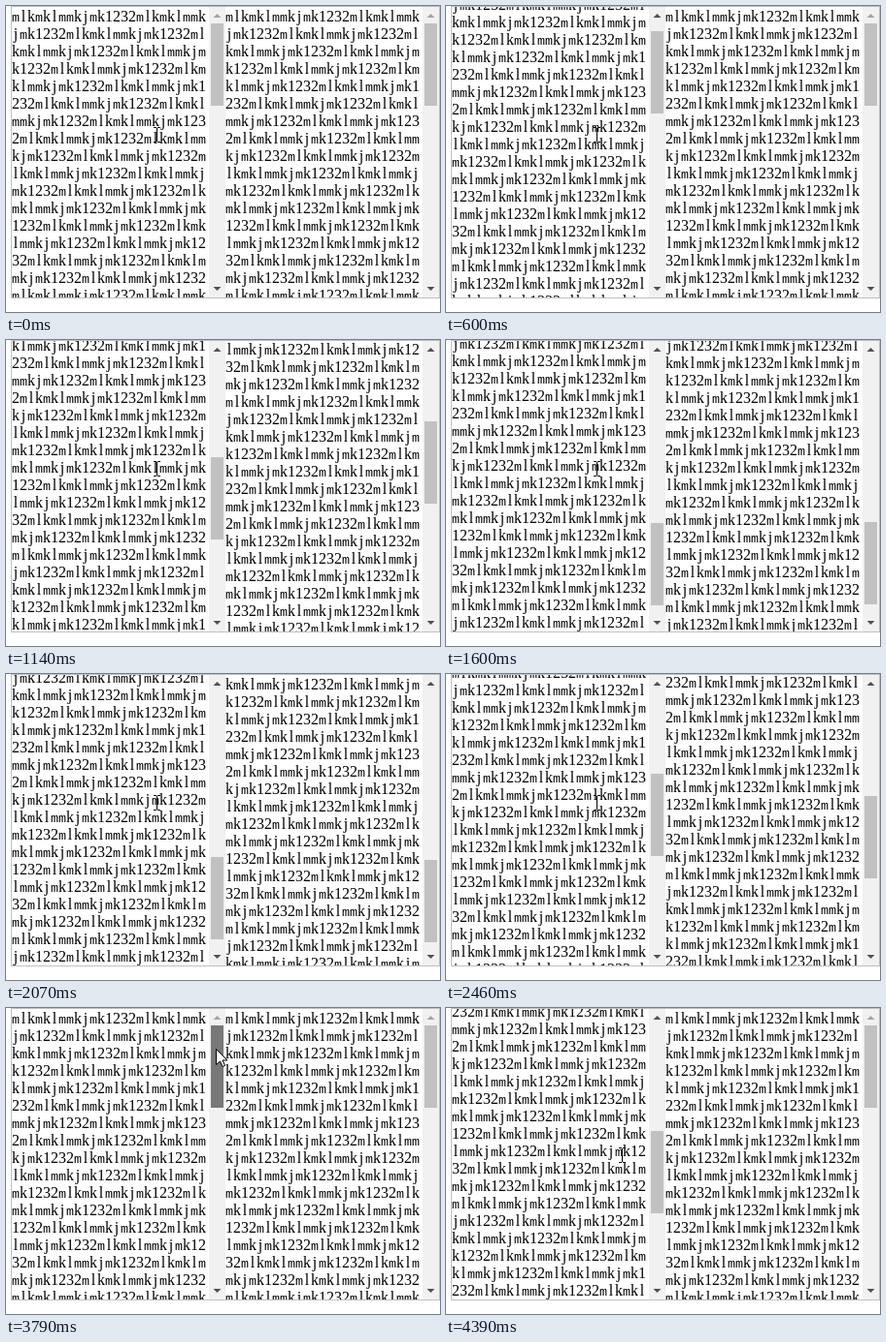
Recreate the animation shown at these times as an HTML page with a canvas. Size 447 by 316 pixels, loop 4470 ms.

```html
<!DOCTYPE html>
<html lang="en">
<head>
<meta charset="utf-8">
<title>Linked scroll panes</title>
<style>
  html, body { margin: 0; width: 100%; height: 100%; overflow: hidden; background: #fff; }
  canvas { display: block; }
</style>
</head>
<body>
<canvas id="stage" width="447" height="316"></canvas>
<script>
const ctx = document.getElementById('stage').getContext('2d');
const LOOP = 4470;
const PHRASE = 'mlkmklmmkjmk1232';
const COLS = 25, ROWS = 52, CELL = 8, LINE = 18;
const TOP = 1, VIEW = 300, BAR = 17;
const MAX_SCROLL = ROWS * LINE - VIEW;
const THUMB = 85, TRAVEL = VIEW - 2 * BAR - THUMB;
const PRESS = 3790, RELEASE = 4310, GRAB_Y = 42;

// time, left scroll, right scroll
const SCROLL = [
  [0, 0, 0],
  [600, 30, 0], [680, 98, 2], [760, 165, 6], [840, 200, 15],
  [980, 225, 60], [1060, 290, 135], [1140, 365, 235], [1220, 440, 340], [1300, 500, 450],
  [1600, 601, 599], [1680, 620, 607], [1750, 632, 618], [1830, 636, 628],
  [1990, 622, 624], [2070, 601, 612], [2150, 560, 585], [2220, 500, 545],
  [2300, 420, 490], [2380, 350, 430], [2460, 300, 380],
  [2550, 235, 320], [2630, 145, 240], [2700, 55, 150], [2780, 0, 71],
  [3000, 0, 0]
];

// time, x, y
const POINTER = [
  [0, 155, 133],
  [3240, 164, 119], [3320, 180, 98], [3400, 200, 74], [3470, 222, 56],
  [3550, 225, 47], [3630, 219, 44], [3700, 216, 42],
  [3870, 217, 52], [3940, 219, 72], [4020, 222, 97], [4090, 223, 122],
  [4160, 220, 142], [4240, 214, 151], [4310, 191, 152], [4390, 181, 152]
];

const at = (table, t) => table.findLast(row => row[0] <= t);

function box(color, x, y, w, h) {
  ctx.fillStyle = color;
  ctx.fillRect(x, y, w, h);
}

function shape(points, fill, stroke) {
  ctx.beginPath();
  points.forEach(([x, y]) => ctx.lineTo(x, y));
  ctx.closePath();
  ctx.fillStyle = fill;
  ctx.fill();
  if (stroke) {
    ctx.strokeStyle = stroke;
    ctx.lineWidth = 1;
    ctx.stroke();
  }
}

function drawText(x, scroll) {
  ctx.fillStyle = '#000';
  ctx.textAlign = 'center';
  ctx.textBaseline = 'alphabetic';
  const first = Math.floor(scroll / LINE);
  const last = Math.min(ROWS - 1, Math.floor((scroll + VIEW) / LINE));
  for (const wide of [true, false]) {
    ctx.font = wide ? '13.33px "Liberation Mono", monospace' : '16px "Liberation Serif", serif';
    for (let row = first; row <= last; row++) {
      const y = TOP + row * LINE - scroll + 15;
      for (let col = 0; col < COLS; col++) {
        const ch = PHRASE[(row * COLS + col) % PHRASE.length];
        if ((ch === 'm') === wide) ctx.fillText(ch, x + col * CELL + CELL / 2, y);
      }
    }
  }
}

function drawBar(x, scroll, color) {
  const mid = x + BAR / 2;
  const thumbY = TOP + BAR + Math.floor(scroll / MAX_SCROLL * TRAVEL);
  const arrow = (base, tip, on) =>
    shape([[mid - 4, base], [mid + 4, base], [mid, tip]], on ? '#505050' : '#a3a3a3');
  box('#f1f1f1', x, TOP, BAR, VIEW);
  arrow(12, 8, scroll > 0);
  arrow(290, 294, scroll < MAX_SCROLL);
  box(color, x + 2, thumbY, 13, THUMB);
}

function drawPane(x, scroll, thumbColor) {
  ctx.save();
  ctx.beginPath();
  ctx.rect(x, TOP, 220, VIEW);
  ctx.clip();
  drawText(x, scroll);
  drawBar(x + 203, scroll, thumbColor);
  ctx.restore();
}

function drawCaret(x, y) {
  box('#000', x, y - 7, 1, 14);
  for (const end of [y - 8, y + 7]) {
    box('#000', x - 3, end, 3, 1);
    box('#000', x + 1, end, 3, 1);
  }
}

function drawArrow(x, y) {
  const outline = [[0, 0], [0, 16], [4, 12.5], [6.5, 18], [9, 17], [6.5, 11.5], [11.5, 11.5]];
  shape(outline.map(([dx, dy]) => [x + dx + 0.5, y + dy + 0.5]), '#fff', '#000');
}

function draw(t) {
  const [, px, py] = at(POINTER, t);
  let [, left, right] = at(SCROLL, t);
  const pressed = t >= PRESS && t < RELEASE;
  const hover = t >= 3550 && t < PRESS;
  if (t >= PRESS) left = Math.round((Math.min(py, 151) - GRAB_Y) * 3.53);

  box('#fff', 0, 0, 447, 316);
  ctx.strokeStyle = '#c0c0c0';
  ctx.lineWidth = 1;
  ctx.strokeRect(5.5, 0.5, 441, 301);
  drawPane(6, left, pressed ? '#787878' : hover ? '#a8a8a8' : '#c1c1c1');
  drawPane(226, right, '#c1c1c1');
  (px >= 209 ? drawArrow : drawCaret)(px, py);
}

function tick() {
  draw(performance.now() % LOOP);
  requestAnimationFrame(tick);
}
tick();
</script>
</body>
</html>
```
